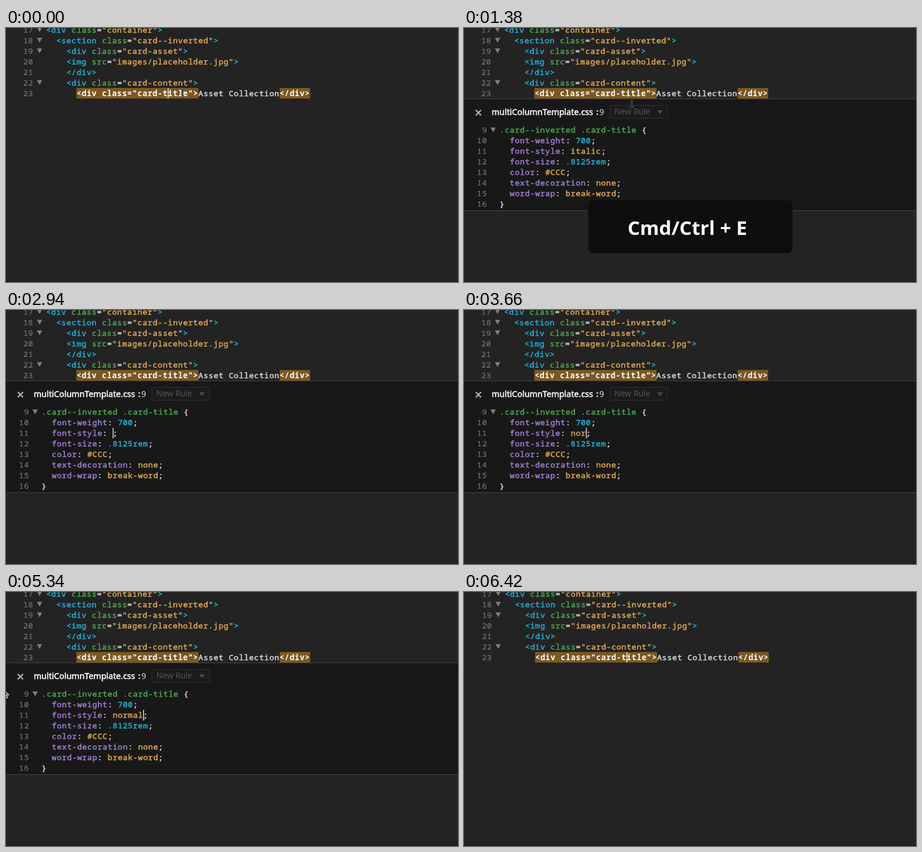
An HTML page that plays this animation: 768 by 432 pixels, repeating every 6.45 s.

```html
<!DOCTYPE html>
<html lang="en">
<head>
<meta charset="utf-8">
<title>Quick edit</title>
<style>
  html, body { margin: 0; width: 100%; height: 100%; overflow: hidden; background: #232323; }
  svg { display: block; width: 768px; height: 432px; }
  text { white-space: pre; }
  .code {
    font: 13.4px "Noto Sans Mono", "DejaVu Sans Mono", monospace;
    letter-spacing: .58px;
    fill: currentColor;
    stroke: currentColor;
    stroke-width: .45px;
  }
  .ui { font-family: "Noto Sans", "Open Sans", sans-serif; }
  .tag { color: #22b4d8; }
  .attr { color: #4dab50; }
  .str { color: #e3ab55; }
  .prop { color: #a680d8; }
  .plain { color: #dcdcdc; }
  .bold { color: #fff; font-weight: 700; stroke: none; }
  .num { color: #757575; stroke-width: .2px; }
</style>
</head>
<body>
<svg viewBox="0 0 768 432">
  <defs>
    <clipPath id="reveal"><rect id="revealBox" y="120" width="768" height="191"/></clipPath>
  </defs>
  <rect width="768" height="432" fill="#232323"/>
  <rect y="431" width="768" height="1" fill="#1a1a1a"/>

  <g id="page">
    <rect x="119.5" y="102" width="207.5" height="18" fill="#7b5822"/>
    <rect x="465" y="102" width="51.7" height="18" fill="#7b5822"/>
    <g id="markup"></g>
    <rect id="pageCaret" x="274.8" y="102" width="1.4" height="18" fill="#eee"/>
  </g>

  <g id="panel" clip-path="url(#reveal)">
    <rect y="120" width="768" height="191" fill="#181818"/>
    <rect y="120" width="768" height="1" fill="#444"/>
    <path d="M20 139.5L29 148.5M29 139.5L20 148.5" stroke="#b0b0b0" stroke-width="2.4"/>
    <g class="ui">
      <text x="47" y="148" font-size="14.2" fill="#fff" stroke="#fff" stroke-width=".5">multiColumnTemplate.css</text>
      <text x="224.5" y="148" font-size="14.2" font-weight="700" fill="#fff">:</text>
      <text x="230" y="148" font-size="14" fill="#ddd">9</text>
      <rect x="248" y="131.5" width="98" height="22" rx="2" fill="#1b1b1b" stroke="#323232"/>
      <text x="255.5" y="147" font-size="13.8" fill="#555">New Rule</text>
      <path d="M328 140h10l-5 6.500z" fill="#484848"/>
    </g>
    <rect id="selection" x="181.3" y="201" width="51.7" height="18" fill="#3a4650"/>
    <g id="rules"></g>
    <rect id="caret" width="1.4" height="18" fill="#eee"/>
    <rect id="panelEdge" width="768" height="1" fill="#444"/>
  </g>

  <g id="ibeam" fill="none">
    <path id="beam" d="M-3.5-7.5Q0-7.5 0-5V5.5Q0 8-3.5 8M3.5-7.5Q0-7.5 0-5V5.5Q0 8 3.5 8M-2 3H2" stroke="#ddd" stroke-opacity=".5" stroke-width="2.4"/>
    <path d="M-3.5-7.5Q0-7.5 0-5V5.5Q0 8-3.5 8M3.5-7.5Q0-7.5 0-5V5.5Q0 8 3.5 8M-2 3H2" stroke="#111" stroke-width="1.2"/>
  </g>
  <path id="arrow" d="M0 0V13L3 10.300L5 15L7.500 14L5.500 9.500H9.500z" fill="#000" stroke="#fff" stroke-width="1.2"/>

  <g id="toast">
    <rect x="211" y="293" width="347" height="90" rx="8" fill="#0d0d0d" fill-opacity=".93"/>
    <text class="ui" x="379.5" y="352" font-size="33" font-weight="700" fill="#fff" text-anchor="middle">Cmd/Ctrl + E</text>
  </g>
</svg>
<script>
const LOOP = 6450, ADVANCE = 8.62, ROW = 18;
const $ = id => document.getElementById(id);

function add(parent, name, attrs, content) {
  const el = document.createElementNS("http://www.w3.org/2000/svg", name);
  for (const key in attrs) el.setAttribute(key, attrs[key]);
  if (content) el.textContent = content;
  return parent.appendChild(el);
}

// Tokens are [style, text] pairs laid out on the monospace grid.
function codeLine(parent, x, y, tokens) {
  let col = 0;
  return tokens.map(([style, content]) => {
    const el = add(parent, "text", { x: x + col * ADVANCE, y, class: "code " + style }, content);
    col += content.length;
    return el;
  });
}

function gutter(parent, right, y, number, foldX) {
  const content = String(number);
  codeLine(parent, right - content.length * ADVANCE, y, [["num", content]]);
  if (foldX) add(parent, "path", { d: `M${foldX - 4.5} ${y - 9}h9l-4.5 8z`, fill: "#808080" });
}

const open = (name, value) => [["tag", "<" + name + " "], ["attr", name === "img" ? "src" : "class"],
  ["plain", "="], ["str", `"${value}"`], ["tag", ">"]];

const markup = [
  [0, open("div", "container"), true],
  [1, open("section", "card--inverted"), true],
  [2, open("div", "card-asset"), true],
  [2, open("img", "images/placeholder.jpg")],
  [2, [["tag", "</div>"]]],
  [2, open("div", "card-content"), true],
  [3, [["bold", '<div class="card-title">'], ["plain", "Asset Collection"], ["bold", "</div>"]]]
];
markup.forEach(([depth, tokens, folds], i) => {
  const y = 7.7 + i * ROW;
  gutter($("markup"), 46.5, y, 17 + i, folds && 57);
  codeLine($("markup"), 68.2 + depth * 2 * ADVANCE, y, tokens);
});

const rule = (name, value, style = "str") =>
  [["prop", "  " + name], ["plain", ": "], [style, value], ["plain", ";"]];

const rules = [
  [["attr", ".card--inverted .card-title"], ["plain", " {"]],
  rule("font-weight", "700", "tag"),
  rule("font-style", "italic"),
  rule("font-size", ".8125rem", "tag"),
  rule("color", "#CCC"),
  rule("text-decoration", "none"),
  rule("word-wrap", "break-word"),
  [["plain", "}"]]
];
const CODE_X = 60.6;
const ruleEls = rules.map((tokens, i) => {
  const y = 178.2 + i * ROW;
  gutter($("rules"), 39.3, y, 9 + i, i === 0 && 49.5);
  return codeLine($("rules"), CODE_X, y, tokens);
});
const [, , styleValue, styleEnd] = ruleEls[2];

const progress = (t, from, to) => Math.min(1, Math.max(0, (t - from) / (to - from)));
const easeOut = p => 1 - (1 - p) ** 3;
const easeInOut = p => p * p * (3 - 2 * p);
const mix = (a, b, p) => a + (b - a) * p;
const show = (el, visible) => el.setAttribute("visibility", visible ? "visible" : "hidden");
const move = (el, x, y) => el.setAttribute("transform", `translate(${x} ${y})`);

const OPEN = 520, SELECT = 2250, ERASE = 2750, TYPE = 3250, KEY = 140, WORD = "normal";

function drawPanel(t) {
  const height = 191 * easeOut(progress(t, OPEN, 830));
  const fade = easeInOut(progress(t, 6000, 6400));
  $("revealBox").setAttribute("height", height);
  $("panelEdge").setAttribute("y", 119 + height);
  $("panel").setAttribute("opacity", 1 - fade);
  show($("panel"), t >= OPEN && fade < 1);
  move($("page"), 1.2 * fade, 0);
  $("pageCaret").setAttribute("opacity", t < OPEN ? 1 : fade);
}

function drawTyping(t) {
  const typed = t < TYPE ? 0 : Math.min(WORD.length, 1 + Math.floor((t - TYPE) / KEY));
  const value = t < ERASE ? "italic" : WORD.slice(0, typed);
  styleValue.textContent = value;
  styleEnd.setAttribute("x", CODE_X + (14 + value.length) * ADVANCE);

  const selected = t >= SELECT && t < ERASE;
  show($("selection"), selected);
  const lastInput = t < ERASE ? 700 : t < TYPE ? ERASE : TYPE + (typed - 1) * KEY;
  const lit = t < lastInput || Math.floor((t - lastInput) / 530) % 2 === 0;
  const editing = t >= ERASE;
  $("caret").setAttribute("x", editing ? CODE_X + (14 + typed) * ADVANCE : 60.4);
  $("caret").setAttribute("y", editing ? 200.5 : 164);
  $("caret").setAttribute("opacity", lit && !selected ? 1 : 0);
}

function drawPointer(t) {
  const toRule = easeInOut(progress(t, 1250, 1760));
  const toEdge = easeInOut(progress(t, 4800, 5270));
  const leave = progress(t, 5350, 5430);
  const x = mix(mix(300, 210, toRule), -5, toEdge) - 14 * leave;
  const y = mix(mix(111, 208, toRule), 165.5, toEdge);
  const active = t < ERASE || t >= 4800;
  const inGutter = x < 45;
  move($("ibeam"), x, y);
  move($("arrow"), x, y);
  show($("ibeam"), active && !inGutter);
  show($("arrow"), active && inGutter && leave < 1);
}

function draw(t) {
  drawPanel(t);
  drawTyping(t);
  drawPointer(t);
  $("toast").setAttribute("opacity", progress(t, 250, 450) * (1 - progress(t, 1400, 1650)));
}

const start = performance.now();
function tick() {
  draw((performance.now() - start) % LOOP);
  requestAnimationFrame(tick);
}
tick();
</script>
</body>
</html>
```
